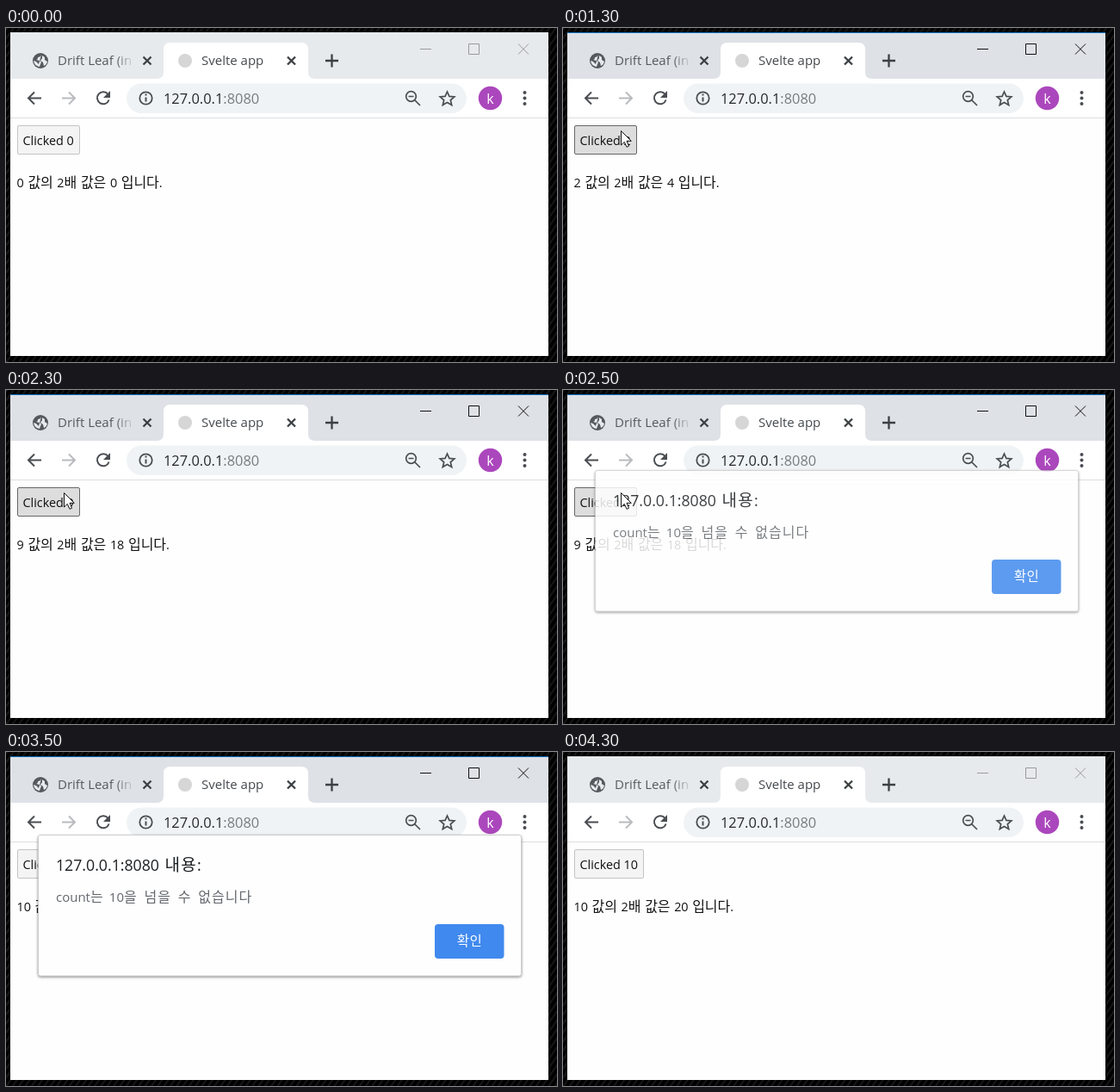
An HTML page for the animation above (4.4 s loop, 640x388 px).

```html
<!DOCTYPE html>
<html lang="ko">
<head>
<meta charset="utf-8">
<title>Svelte app</title>
<style>
  html, body { margin: 0; width: 100%; height: 100%; overflow: hidden; background: #000; }
  svg { display: block; }
  text { font-family: "Open Sans", "Noto Sans CJK KR", sans-serif; white-space: pre; }
  .ko { font-family: "Noto Sans CJK KR", "Noto Sans CJK", sans-serif; font-weight: 300; }
  .line { fill: none; stroke: #4a4d51; stroke-width: 2; }
  .page { font-size: 14.4px; fill: #111; }
  .page .ko { font-size: 16px; }

  .bar, .accent, .controls, .cursor, .dialog, .ring { animation: 4400ms step-end infinite; }
  .bar { animation-name: bar; }
  .accent { animation-name: accent; }
  .controls { animation-name: controls; fill: none; }
  .cursor { animation-name: cursor; }
  .dialog { animation-name: dialog; }
  .ring { animation-name: ring; }

  @keyframes bar {
    0%, 97.72% { fill: #e7eaed; }
    20.45% { fill: #dee1e6; }
  }
  @keyframes accent {
    0%, 97.72% { opacity: 0; }
    20.45% { opacity: 1; }
  }
  @keyframes controls {
    0%, 97.72% { stroke: #999; }
    20.45% { stroke: #111; }
  }
  @keyframes cursor {
    0%     { transform: translate(700px, 80px); }
    2.27%  { transform: translate(469px, 73px); }
    4.54%  { transform: translate(267px, 116px); }
    6.81%  { transform: translate(80px, 152px); }
    9.09%  { transform: translate(98px, 122px); }
    13.63% { transform: translate(80px, 120px); }
    15.9%  { transform: translate(67px, 119px); }
    61.36% { transform: translate(262px, 150px); }
    63.63% { transform: translate(470px, 186px); }
    65.9%  { transform: translate(629px, 216px); }
    68.18%, 100% { transform: translate(700px, 225px); }
  }
  @keyframes dialog {
    0%     { opacity: 0; transform: translateY(-22px); }
    54.54% { opacity: .35; transform: translateY(-21px); }
    56.81% { opacity: .85; transform: translateY(-6px); }
    59.09% { opacity: 1; transform: none; }
    79.54% { opacity: 1; transform: translateY(-3px); }
    81.81% { opacity: .6; transform: translateY(-12px); }
    84.09% { opacity: .2; transform: translateY(-19px); }
    86.36%, 100% { opacity: 0; transform: translateY(-22px); }
  }
  @keyframes ring {
    0%, 79.54% { opacity: 0; }
    59.09% { opacity: 1; }
  }
</style>
</head>
<body>
<svg width="640" height="388" viewBox="0 0 640 388">
  <defs>
    <pattern id="hatch" width="6" height="6" patternUnits="userSpaceOnUse" patternTransform="rotate(35)">
      <rect width="6" height="6" fill="#000"/>
      <rect width="2" height="6" fill="#161616"/>
    </pattern>
    <linearGradient id="fade" gradientUnits="userSpaceOnUse" x1="60" x2="150" y1="0" y2="0">
      <stop offset=".74" stop-color="#55595e"/>
      <stop offset="1" stop-color="#55595e" stop-opacity="0"/>
    </linearGradient>
    <clipPath id="tabClip"><rect x="56" y="20" width="94" height="36"/></clipPath>
    <filter id="shadow" x="-5%" y="-10%" width="110%" height="125%">
      <feDropShadow dx="0" dy="1.2" stdDeviation="1.6" flood-opacity=".5"/>
    </filter>
  </defs>

  <rect width="640" height="388" fill="url(#hatch)"/>
  <rect x="5" y="5" width="625" height="376" fill="#fefefe"/>
  <rect class="bar" x="5" y="5" width="625" height="54"/>
  <rect class="accent" x="5" y="5" width="625" height="1" fill="#1a78c8"/>

  <!-- tabs -->
  <path d="M175 59q8 0 8-8V25q0-8 8-8H343q8 0 8 8V51q0 8 8 8z" fill="#fff"/>
  <circle cx="40" cy="38" r="9" fill="#55595e"/>
  <path d="M41 31q-1 3-4 3 0 3-2 3l4 1q3 1 1 4l-1 3q-6-1-7-7l3 1 3 3M42 32l3 2v3l3 2q-1 4-4 5l-1-4-3-2 2-3z" fill="#e7eaed"/>
  <text x="60" y="43" font-size="15" fill="url(#fade)" clip-path="url(#tabClip)">Drift Leaf (in</text>
  <circle cx="208" cy="38" r="8" fill="#d6d6d6"/>
  <text x="227" y="43" font-size="15" fill="#45494d">Svelte app</text>
  <path class="line" d="M159.500 33.500l9 9m0-9l-9 9M327 33.500l9 9m0-9l-9 9M371 38h15m-7.500-7.500v15" style="stroke:#3c4043;stroke-width:2.300"/>
  <g class="controls">
    <path d="M481 24.500h13M537.500 18.500h12v12h-12zM595 18.500l12 12m0-12l-12 12"/>
  </g>

  <!-- toolbar -->
  <rect x="5" y="59" width="625" height="45" fill="#fff"/>
  <path d="M5 104.500H630" stroke="#dcdee0"/>
  <path class="line" d="M41 81.500H26m7-7l-7 7 7 7"/>
  <path class="line" d="M65 81.500h15m-7-7l7 7-7 7" style="stroke:#b9bbbe"/>
  <path class="line" d="M118.500 77A7 7 0 1 0 119.600 83.500"/>
  <path d="M121 73v8h-8z" fill="#4a4d51"/>
  <rect x="140" y="64.500" width="395" height="34.500" rx="17.250" fill="#eff3f5"/>
  <circle class="line" cx="162.500" cy="81.500" r="7.200" style="stroke-width:1.8"/>
  <path class="line" d="M162.500 80.500v5m0-9v2"/>
  <text x="183" y="87.500" font-size="16.400" fill="#25282c">127.0.0.1<tspan fill="#777c81">:8080</tspan></text>
  <circle class="line" cx="470.500" cy="79.500" r="5.800" style="stroke-width:1.7"/>
  <path class="line" d="M474.500 83.500l6.500 6.500M467.500 79.500h6" style="stroke-width:1.7"/>
  <path class="line" d="M512.500 74l2.400 5.400 5.900.5-4.500 3.900 1.400 5.700-5.200-3-5.200 3 1.400-5.700-4.500-3.900 5.900-.5z" style="stroke-width:1.7"/>
  <circle cx="562.500" cy="81.500" r="13.700" fill="#ab47bc"/>
  <text x="562.500" y="87.500" font-size="16" fill="#fff" text-anchor="middle">k</text>
  <g fill="#4a4d51">
    <circle cx="602.500" cy="75" r="2"/><circle cx="602.500" cy="81.500" r="2"/><circle cx="602.500" cy="88" r="2"/>
  </g>

  <!-- page -->
  <rect id="button" x="13.500" y="113.500" width="72" height="33" rx="1.500"/>
  <text class="page" x="19.500" y="136">Clicked <tspan id="count">0</tspan></text>
  <text class="page" x="12.600" y="184.500" style="word-spacing:.8px"><tspan id="value">0</tspan> <tspan class="ko">값의</tspan> 2<tspan class="ko">배</tspan> <tspan class="ko">값은</tspan> <tspan id="twice">0</tspan> <tspan class="ko">입니다</tspan>.</text>

  <!-- alert -->
  <g class="dialog">
    <rect x="37.500" y="99.500" width="561" height="163.500" rx="2.500" fill="#fefefe" stroke="#bbb" stroke-width=".6" filter="url(#shadow)"/>
    <text x="58" y="141" font-size="17.700" fill="#1c1f22" style="word-spacing:2px">127.0.0.1:8080 <tspan class="ko" font-size="19" letter-spacing="1.200">내용</tspan>:</text>
    <text x="58" y="177" font-size="15" fill="#63676c" style="word-spacing:2.300px">count<tspan class="ko" font-size="16" letter-spacing="1">는</tspan> 10<tspan class="ko" font-size="16" letter-spacing="1">을 넘을 수 없습니다</tspan></text>
    <rect class="ring" x="497" y="202" width="82" height="42" rx="5" fill="#a9cbf8"/>
    <rect x="498" y="203" width="80.500" height="40" rx="4" fill="#4089ee"/>
    <text class="ko" x="538.500" y="228" font-size="15.500" fill="#fff" text-anchor="middle" letter-spacing=".5">확인</text>
  </g>

  <path class="cursor" d="M.5.5V17l3.800-3.600L7 19.300l2.500-1.100L7 12.300h5.300z" fill="#fff" stroke="#111"/>
</svg>
<script>
  const $ = id => document.getElementById(id);
  const LOOP = 4400, STEP = 100, LEAD = 10;
  const FIRST = 935, PERIOD = 150, HOLD = 80;

  // Rapid clicks: each release adds one; the tenth waits for the alert.
  function stateAt(t) {
    if (t >= 3500) return { n: 10, down: false, focus: false };
    if (t >= 2300) return { n: 9, down: true, focus: true };
    if (t < FIRST) return { n: 0, down: false, focus: false };
    const since = t - FIRST;
    const down = since % PERIOD < HOLD;
    return { n: Math.floor(since / PERIOD) + (down ? 0 : 1), down, focus: true };
  }

  function draw(now) {
    const t = Math.floor((now + LEAD) % LOOP / STEP) * STEP;
    const { n, down, focus } = stateAt(t);
    $('count').textContent = $('value').textContent = n;
    $('twice').textContent = n * 2;
    const button = $('button');
    button.setAttribute('width', n > 9 ? 80 : 72);
    button.setAttribute('fill', down ? '#ddd' : '#f4f4f4');
    button.setAttribute('stroke', focus ? '#666' : '#c4c4c4');
    requestAnimationFrame(draw);
  }
  draw(0);
</script>
</body>
</html>
```
